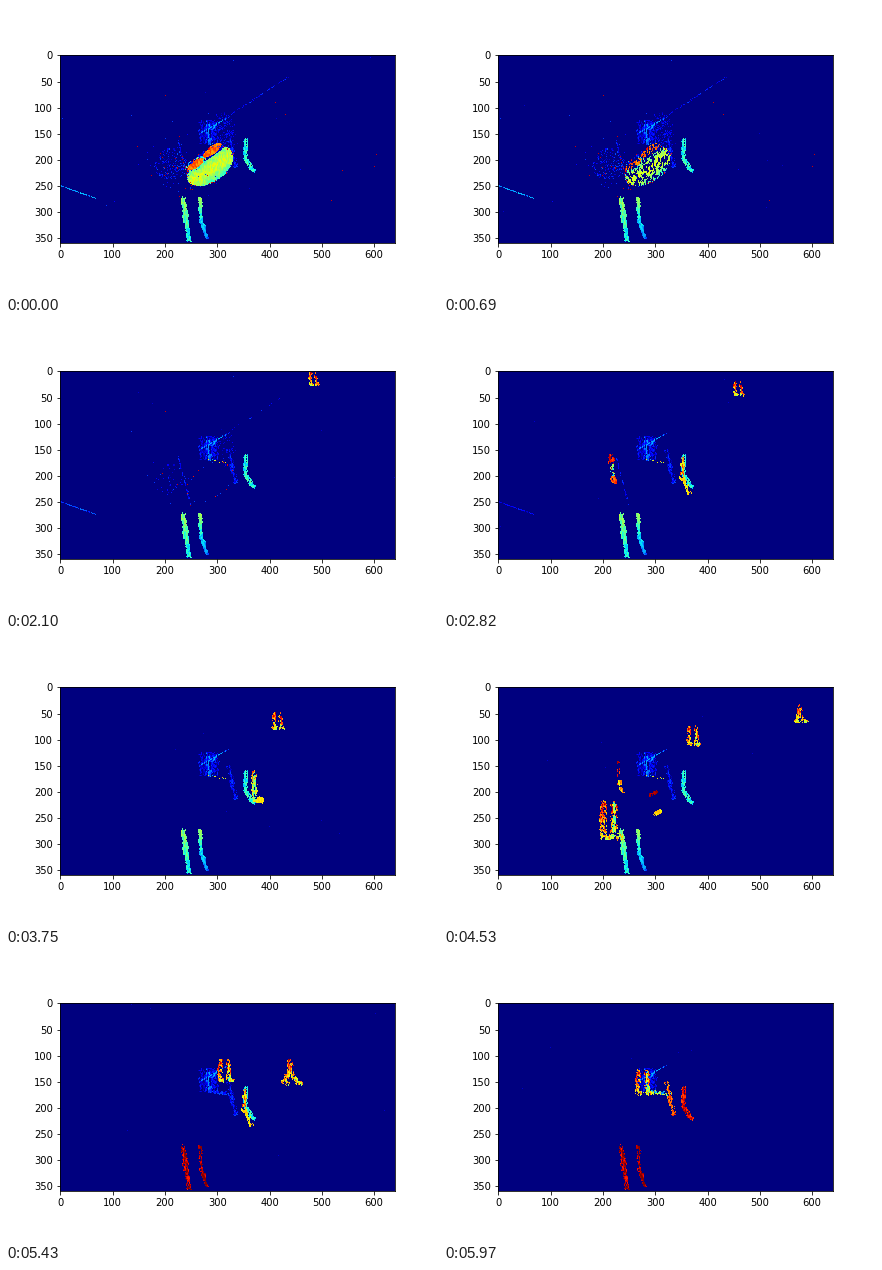
Animation of 432x288 px, one loop 6 s. Source, as a matplotlib script:

```python
import numpy as np
import matplotlib.pyplot as plt
from matplotlib.animation import FuncAnimation

FRAMES, STEP = 200, 30
W, H = 335, 188          # one cell per screen pixel
SX, SY = 640 / W, 360 / H
X, Y = np.meshgrid((np.arange(W) + 0.5) * SX, (np.arange(H) + 0.5) * SY)

rng = np.random.default_rng(11)


def clumped(a):
    """Blur noise a little and spread it evenly over 0..1 again."""
    s = a + 0.7 * (np.roll(a, 1, 0) + np.roll(a, -1, 0)) + 0.5 * np.roll(a, 1, 1)
    return (s.ravel().argsort().argsort() / a.size).reshape(a.shape)


GRAIN = rng.random((3, H, W))
CLUMP = np.array([clumped(a) for a in GRAIN])


def ramp(t, a, b):
    return float(np.clip((t - a) / (b - a), 0, 1))


def stroke(pts, r, tex=CLUMP, rough=0.4):
    """Mask of a ragged polyline with half-width r."""
    d = np.full((H, W), 1e9)
    for (x0, y0), (x1, y1) in zip(pts, pts[1:]):
        dx, dy = x1 - x0, y1 - y0
        u = ((X - x0) * dx + (Y - y0) * dy) / (dx * dx + dy * dy + 1e-9)
        u = np.clip(u, 0, 1)
        d = np.minimum(d, np.hypot(X - x0 - u * dx, Y - y0 - u * dy))
    return d < r * (1 + rough * (2 * tex[2] - 1))


def paint(img, mask, level, spread=0.0, density=1.0, tex=CLUMP):
    m = mask & (tex[0] < density)
    img[m] = (level + spread * (tex[1] - 0.5))[m]


def put(img, x, y, level):
    c, r = int(x / SX), int(y / SY)
    if 0 <= c < W and 0 <= r < H:
        img[r, c] = level


# Slow background
FLOOR = stroke([(0, 250), (70, 275)], 1.1, rough=0.1)
BOX = stroke([(284, 138), (284, 164)], 18, rough=0.2) & (Y > 127) & (Y < 173)
CORE = stroke([(280, 136), (287, 168)], 5)
RAYS = stroke([(266, 153), (323, 121)], 1.1) | stroke([(281, 153), (304, 131)], 1)
LONG_RAY = stroke([(300, 133), (436, 44)], 1.3)
BASE = stroke([(285, 170), (327, 177)], 3.5)
STREAK = stroke([(322, 157), (330, 190), (335, 212)], 4)
HAZE = stroke([(312, 130), (318, 168)], 16)
SCATTER = np.hypot((X - 212) / 32, (Y - 210) / 30) < 1
CRACK = stroke([(226, 167), (250, 257)], 1.2)
DOTS = stroke([(284, 172), (318, 177)], 2)

# Standing legs
LEG_1 = stroke([(235, 276), (241, 315), (247, 353)], 4.6)
LEG_2 = stroke([(267, 275), (270, 317), (280, 348)], 3.8)
LEG_3 = stroke([(355, 166), (354, 200), (369, 221)], 4.2)

# Large bright body in its own tilted axes
U = 0.82 * (X - 284) - 0.57 * (Y - 210)
V = 0.57 * (X - 284) + 0.82 * (Y - 210)


def oval(u, v, a, b):
    return np.hypot((U - u) / a, (V - v) / b)


SHELL = oval(0, 4, 50, 30)
ROOF = oval(21, -18, 21, 7) < 1
HOOD = oval(-20, -15, 18, 7) < 1
HOOD_EDGE = abs(oval(-20, -15, 20, 9) - 1) < 0.12

SPECKS = 25
SPECK_POS = rng.uniform((0, 0), (640, 300), (SPECKS, 2))
SPARKS = 60
SPARK_POS = rng.normal((225, 212), (27, 22), (SPARKS, 2))
DOT_POS = np.vstack([SPECK_POS, SPARK_POS])
DOT_END = rng.uniform(400, 2600, SPECKS + SPARKS)
DOT_LEVEL = rng.choice([0.93, 0.18, 0.12], SPECKS + SPARKS)


def walker(img, x, y, h, gap, top=0.6, level=0.76, green=0.5):
    """Two legs hanging from (x, y); gap is half the stride."""
    tex = np.roll(CLUMP, (int(y / SY), int(x / SX)), axis=(1, 2))
    r = 1.5 + 0.055 * h
    shade = level + 0.1 - 0.2 * np.clip((Y - y) / h, 0, 1)
    for side in (-1, 1):
        hip, foot = x + side * gap * top, x + side * gap
        pts = [(hip, y + r), (hip + side, y + 0.5 * h),
               (foot, y + 0.9 * h), (foot + 0.15 * h, y + h - r)]
        paint(img, stroke(pts, r, tex), shade, 0.28, 0.78, tex)
        if side > 0:
            paint(img, stroke(pts[:3], r * 0.5, tex), 0.53, 0.3, green, tex)


def background(img, t):
    if t < 3300:
        paint(img, FLOOR, 0.28 - 0.17 * ramp(t, 1400, 2800), 0.1, 0.85)
    early = 1 - ramp(t, 900, 2600)
    paint(img, HAZE, 0.1, 0.12, 0.3 * early, GRAIN)
    paint(img, LONG_RAY, 0.13, 0.15, 0.45 * early, GRAIN)
    paint(img, SCATTER, 0.12, 0.2, 0.2 * early, GRAIN)
    paint(img, CRACK, np.where(GRAIN[2] < 0.35 * early, 0.92, 0.13), 0.1,
          0.65 * (1 - ramp(t, 2500, 3500)))
    paint(img, BOX, 0.1, 0.14, 0.75)
    paint(img, CORE, 0.2, 0.2, 0.75)
    paint(img, RAYS, 0.22, 0.2, 0.85)

    late = ramp(t, 5600, 5930)
    if t > 5100:
        paint(img, BASE, np.where(CLUMP[2] < late, 0.48, 0.17), 0.1 + 0.4 * late, 0.8)
    paint(img, STREAK, np.where(CLUMP[2] < late, 0.8, 0.12), 0.18, 0.75)
    if 1900 < t < 5100:
        paint(img, DOTS, 0.62, 0.2, 0.2, GRAIN)


def body(img, t):
    solid = 1 - ramp(t, 250, 1100)
    if solid:
        paint(img, (SHELL < 1) & (V < -8), 0.06, 0.12, solid)
        paint(img, (SHELL < 1) & (V >= -9), 0.47 + 0.13 * np.cos((V - 9) / 12), 0.12, solid)
        paint(img, HOOD_EDGE, 0.42, 0.3, 0.8 * solid)
        paint(img, ROOF | HOOD, 0.79, 0.12, solid)
    trace = 1 - ramp(t, 1300, 2500)
    paint(img, abs(SHELL - 1) < 0.05, np.where(GRAIN[1] < 0.6, 0.92, 0.15),
          0.1, 0.2 * trace, GRAIN)


def legs(img, t):
    red = ramp(t, 4750, 5250)
    hot = CLUMP[2] < red
    fall = (Y - 272) / 84
    paint(img, LEG_1, np.where(hot, 0.95, 0.52 - 0.16 * fall), 0.16, 1 - 0.15 * red)
    paint(img, LEG_2, np.where(hot, 0.95, 0.52 - 0.33 * fall), 0.13, 1 - 0.25 * red)
    red = ramp(t, 5650, 5900)
    paint(img, LEG_3, np.where(CLUMP[2] < red, 0.91, 0.39), 0.17, 0.95)
    if 2450 < t < 3120 or 5050 < t < 5720:
        paint(img, stroke([(352, 172), (352, 204)], 4), 0.76, 0.35, 0.65)
        paint(img, stroke([(352, 204), (365, 232)], 4.5), 0.67, 0.1, 0.75)


def visitors(img, t):
    # Far walker, speeding up as it comes closer
    if t > 900:
        p = (t - 1380) / 4590
        q = np.sign(p) * abs(p) ** 1.5
        y = -8 + 138 * np.sign(p) * abs(p) ** 1.3
        walker(img, 497 - 221 * q, y, 24 + 25 * q, 5 + 5 * q, top=0.8)
    # Quick one from the right edge
    if 4100 < t < 5850:
        p = (t - 4100) / 1750
        walker(img, 642 - 266 * p, 145 * p, 28 + 28 * p, 5 + 11 * p, top=0.1, green=0.15)
    # Near walker: waits, then crosses to the left
    if 3150 < t < 5050:
        q = ramp(t, 3750, 5050)
        walker(img, 371 - 266 * q, 163 + 92 * q, 58 + 30 * q, min(11, 30 * q),
               top=0.9, level=0.65 + 0.18 * q, green=0.7)
        if q < 0.3:
            x, y = 381 - 266 * q, 216 + 92 * q
            paint(img, stroke([(x, y), (x + 2, y + 1)], 6.5, rough=0.15), 0.67, 0.04)
    # Brief remnants
    if 2450 < t < 3250:
        paint(img, stroke([(217, 169), (216, 173)], 6.5), 0.9, 0.15, 0.7)
        paint(img, stroke([(217, 185), (219, 197)], 5), 0.62, 0.6, 0.45)
        paint(img, stroke([(219, 206), (222, 211)], 5), 0.83, 0.14, 0.9)
    if 4200 < t < 4900:
        paint(img, stroke([(230, 145), (230, 172)], 2.5), 0.9, 0.15, 0.5)
        paint(img, stroke([(233, 184), (238, 200)], 4), 0.73, 0.25, 0.85)
        paint(img, stroke([(302, 242), (309, 239)], 4.2), 0.68, 0.08)
        paint(img, stroke([(290, 208), (303, 200)], 3.2), 0.97, 0.06, 0.85)


def specks(img, t, i):
    for (x, y), end, level in zip(DOT_POS, DOT_END, DOT_LEVEL):
        if t < end:
            put(img, x, y, level)
    flick = np.random.default_rng(500 + i // 4)
    for x, y in flick.uniform((0, 0), (640, 300), (6, 2)):
        put(img, x, y, 0.07)


def picture(i):
    t = i * STEP
    img = np.zeros((H, W))
    background(img, t)
    body(img, t)
    legs(img, t)
    visitors(img, t)
    specks(img, t, i)
    return img


fig = plt.figure(figsize=(6, 4), dpi=72, facecolor="white")
fig.subplots_adjust(left=0.125, right=0.9, bottom=0.125, top=0.88)
ax = fig.add_subplot()
im = ax.imshow(picture(0), cmap="jet", vmin=0, vmax=1, interpolation="nearest",
               extent=(-0.5, 639.5, 359.5, -0.5))
ax.set_xticks(range(0, 601, 100))
ax.set_yticks(range(0, 351, 50))


def update(i):
    im.set_data(picture(i))
    return [im]


anim = FuncAnimation(fig, update, frames=FRAMES, interval=STEP, repeat=True,
                     repeat_delay=0, blit=False)
plt.show()
```
